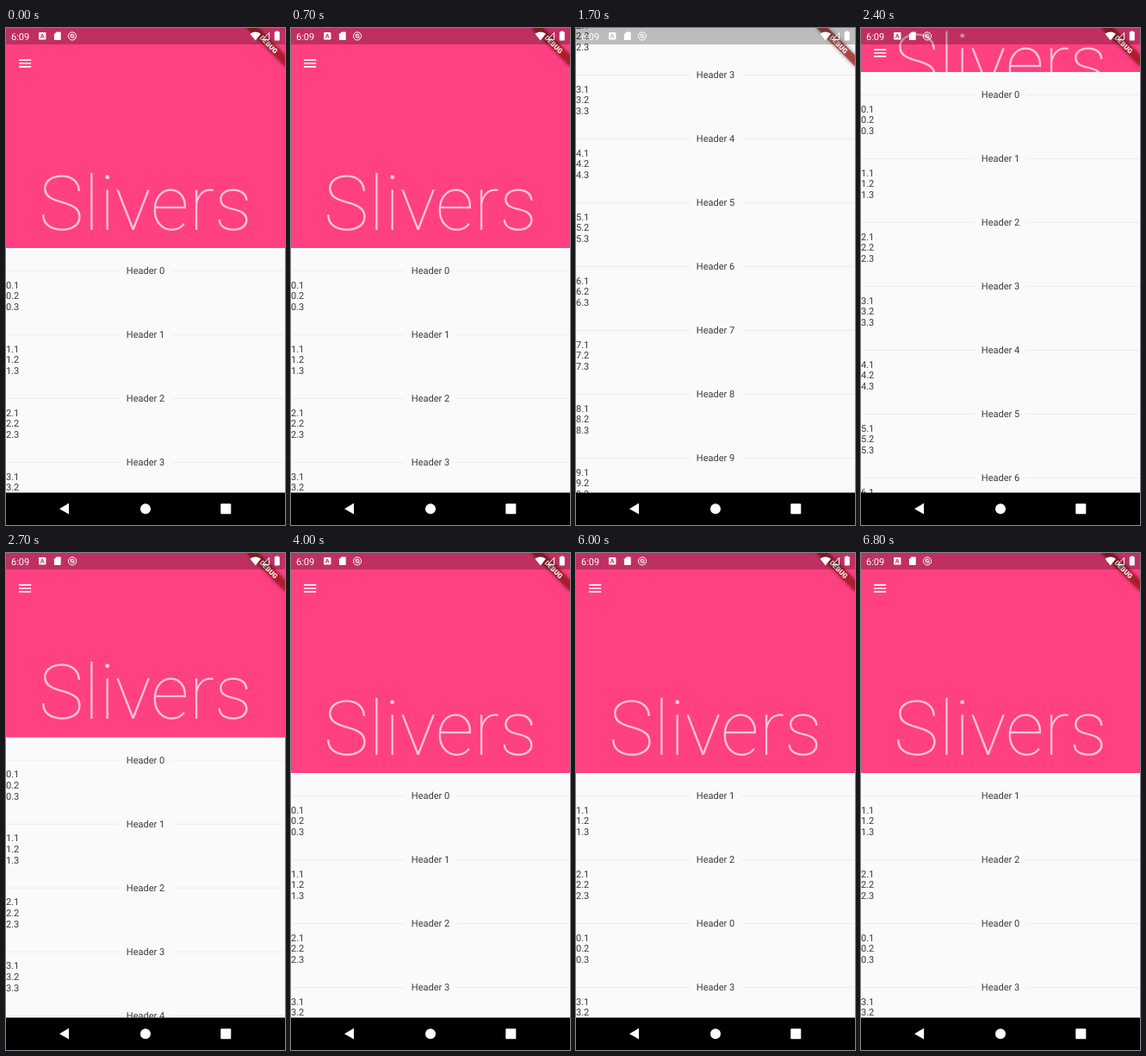
Recreate the animation shown at these times as an HTML page. Size 324x576 px, loop 7000 ms.

```html
<!DOCTYPE html>
<html lang="en">
<head>
<meta charset="utf-8">
<title>Slivers</title>
<style>
  html, body { margin: 0; width: 100%; height: 100%; overflow: hidden; background: #fafafa; }
  svg { display: block; }
  text { font-family: Roboto, "Liberation Sans", sans-serif; text-rendering: geometricPrecision; }
  .item text { font-size: 11.03px; fill: #3a3a3a; }
  .item path { stroke: #000; stroke-opacity: .06; }
  #title { font-size: 88.2px; font-weight: 100; fill: #fff; fill-opacity: .7; text-anchor: middle; }
  #clock { font-size: 11px; }
  #debug text { font-size: 8px; font-weight: 900; fill: #fff; text-anchor: middle; }
</style>
</head>
<body>
<svg id="stage" width="324" height="576" viewBox="0 0 324 576">
  <defs>
    <filter id="blur" x="-20%" y="-80%" width="140%" height="260%"><feGaussianBlur stdDeviation="2"/></filter>
  </defs>
  <rect width="324" height="576" fill="#fafafa"/>
  <g id="list"></g>

  <svg id="bar" width="324" height="255">
    <rect width="324" height="255" fill="#ff4081"/>
    <text id="title" x="162" y="233.5">Slivers</text>
    <path id="menu" d="M15 37.1h14.2M15 41h14.2M15 44.9h14.2" stroke="#fff" stroke-width="1.6"/>
  </svg>

  <g id="drag"></g>

  <g id="debug" transform="translate(324 0) rotate(45)">
    <rect x="-31.5" y="22.05" width="63" height="9.45" fill-opacity=".45" filter="url(#blur)"/>
    <rect x="-31.5" y="22.05" width="63" height="9.45" fill="#b71c1c" fill-opacity=".63"/>
    <text y="29.7">DEBUG</text>
  </g>

  <g id="status" fill="#fff">
    <rect width="324" height="19" fill="#000" fill-opacity=".25"/>
    <text id="clock" x="6" y="13.6">6:09</text>
    <path fill-rule="evenodd" d="M39 5h6.4q1 0 1 1v6.6q0 1-1 1h-6.4q-1 0-1-1v-6.6q0-1 1-1zM41.7 6.8l-2 5h1l.5-1.3h2l.5 1.3h1l-2-5zM42.2 8l.7 1.8h-1.4z"/>
    <path d="M58.6 4.5h4.2q.9 0 .9.9v7.8q0 .9-.9.9h-6q-.9 0-.9-.9v-5.9z"/>
    <g fill="none" stroke="#fff">
      <circle cx="77" cy="9.4" r="4.6"/>
      <circle cx="77" cy="9.2" r="2.1"/>
      <path d="M75 7.4l4.6 4.6"/>
    </g>
    <path d="M283.4 6.8q6.3-4.6 12.6 0l-6.3 7.6z"/>
    <path d="M305.6 5.4v8.2h-7.6z" fill="none" stroke="#fff"/>
    <path d="M313.6 4.2v-.8h2.4v.8h1.1q.7 0 .7.7v8.8q0 .7-.7.7h-4.6q-.7 0-.7-.7v-8.8q0-.7.7-.7z"/>
  </g>

  <g id="nav" fill="#fff">
    <rect y="538.5" width="324" height="37.5" fill="#000"/>
    <path d="M62 557.2l11-6.4v12.8z"/>
    <circle cx="162" cy="557.2" r="6"/>
    <rect x="249.3" y="551.2" width="12" height="12" rx="1"/>
  </g>
</svg>

<script>
const LOOP = 7000, STEP = 100;
const TOP = 255, PITCH = 74.03, MIN_BAR = 63, COUNT = 12;
const ASCENT = 82, DESCENT = 21.5;
const DRAG = { start: 4300, end: 4900, drop: 5300, done: 5600, dy: 225 };

// scroll offset: [ms, px]
const SCROLL = [[1000, 0], [1300, 40], [1500, 235], [1700, 449], [1900, 490],
                [2100, 465], [2400, 204], [2600, 80], [2900, 0]];

const $ = id => document.getElementById(id);
const clamp = (v, lo = 0, hi = 1) => Math.min(hi, Math.max(lo, v));
const phase = (t, from, to) => clamp((t - from) / (to - from));
const ease = p => p * p * (3 - 2 * p);
const move = (el, y) => el.setAttribute('transform', `translate(0 ${y.toFixed(2)})`);

function makeItem(n, parent) {
  const g = document.createElementNS('http://www.w3.org/2000/svg', 'g');
  g.setAttribute('class', 'item');
  const rows = [1, 2, 3].map(r => `<text y="${33.9 + r * 12.6}">${n}.${r}</text>`).join('');
  g.innerHTML = `<path d="M0 26.3H132M192 26.3H324"/>
    <text x="162" y="30" text-anchor="middle">Header ${n}</text>${rows}`;
  parent.append(g);
  return g;
}

const items = Array.from({ length: COUNT }, (_, n) => makeItem(n, $('list')));
const dragged = makeItem(0, $('drag'));

function slope(i) {
  if (i === 0 || i === SCROLL.length - 1) return 0;
  const [a, b] = [SCROLL[i - 1], SCROLL[i + 1]];
  return (b[1] - a[1]) / (b[0] - a[0]);
}

function scrollAt(t) {
  const i = SCROLL.findIndex(p => p[0] > t) - 1;
  if (i < 0) return 0;
  const [t0, a] = SCROLL[i], [t1, b] = SCROLL[i + 1];
  const d = t1 - t0, u = (t - t0) / d, v = 1 - u;
  return Math.max(0, v * v * ((1 + 2 * u) * a + u * d * slope(i))
                   + u * u * ((1 + 2 * v) * b - v * d * slope(i + 1)));
}

function drawBar(bottom) {
  const lift = Math.max(0, MIN_BAR - bottom);
  $('bar').setAttribute('height', Math.max(0, bottom));
  $('title').setAttribute('y', Math.max(bottom - DESCENT, ASCENT) - lift);
  move($('menu'), -lift);
}

function draw(t) {
  const top = TOP - scrollAt(t);
  drawBar(top);

  const first = ease(phase(t, 4400, 4600)), second = ease(phase(t, 4600, 4800));
  const shift = [first + second, -first, -second];
  items.forEach((el, n) => move(el, top + PITCH * (n + (shift[n] || 0))));

  const ghost = t < DRAG.start ? 1 : 0.3 + 0.7 * phase(t, DRAG.drop, DRAG.done);
  items[0].setAttribute('opacity', ghost);

  const held = t >= DRAG.start && t < DRAG.drop;
  dragged.setAttribute('visibility', held ? 'visible' : 'hidden');
  move(dragged, TOP + DRAG.dy * ease(phase(t, DRAG.start, DRAG.end)));
}

const begin = performance.now();
function tick() {
  const t = (performance.now() - begin) % LOOP;
  draw(Math.floor(t / STEP) * STEP);
  requestAnimationFrame(tick);
}
tick();
</script>
</body>
</html>
```
